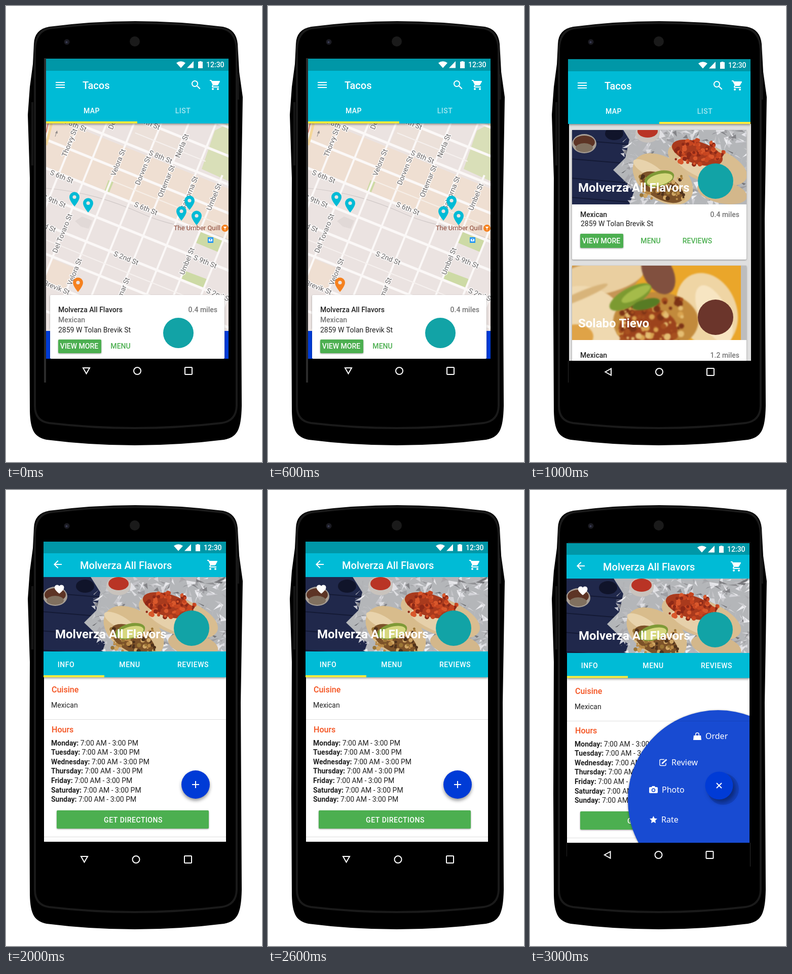
Recreate the animation shown at these times as an HTML page with a canvas. Size 505 by 901 pixels, loop 4000 ms.

```html
<!DOCTYPE html>
<html lang="en">
<head>
<meta charset="utf-8">
<title>Taco finder</title>
<style>
html, body { margin: 0; width: 100%; height: 100%; overflow: hidden; background: #fff; }
canvas { display: block; }
</style>
</head>
<body>
<canvas id="stage" width="505" height="901"></canvas>
<script>
const ctx = document.getElementById('stage').getContext('2d');
const SANS = 'Roboto, sans-serif';
const CYAN = '#00bbd6', DARK_CYAN = '#0097a7', YELLOW = '#ffeb3b', GREEN = '#4caf50';
const BLUE = '#003bd6', INK = '#212121', GREY = '#757575', ORANGE = '#f4511e';
const PLACE = 'Molverza All Flavors', ADDRESS = '2859 W Tolan Brevik St';

const ICON = {
  menu: 'M3 18h18v-2H3zM3 13h18v-2H3zM3 6v2h18V6z',
  search: 'M15.5 14h-.79l-.28-.27A6.5 6.5 0 1 0 13.73 14.43l.27.28v.79l5 4.99L20.49 19zM9.5 14A4.5 4.5 0 1 1 9.5 5a4.5 4.5 0 0 1 0 9z',
  cart: 'M7 18a2 2 0 1 0 0 4 2 2 0 0 0 0-4zM1 2v2h2l3.6 7.59-1.35 2.45A2 2 0 0 0 7 17h12v-2H7.42a.25.25 0 0 1-.22-.37l.9-1.63h7.45a2 2 0 0 0 1.75-1.03l3.58-6.49A1 1 0 0 0 20 4H5.21l-.94-2zM17 18a2 2 0 1 0 0 4 2 2 0 0 0 0-4z',
  back: 'M20 11H7.83l5.59-5.59L12 4l-8 8 8 8 1.41-1.41L7.83 13H20z',
  heart: 'M12 21.35l-1.45-1.32C5.4 15.36 2 12.28 2 8.5A5.5 5.5 0 0 1 12 5.09 5.5 5.5 0 0 1 22 8.5c0 3.78-3.4 6.86-8.55 11.54z',
  pin: 'M0-20a7 7 0 0 0-7 7C-7-7.75 0 0 0 0s7-7.75 7-13a7 7 0 0 0-7-7z',
  wifi: 'M0 3.5Q9-3 18 3.5L9 13.5z',
  bag: 'M1 6h14l1 9H0zM4 8V4a4 4 0 0 1 8 0v4h-1.5V4a2.5 2.5 0 0 0-5 0v4z',
  camera: 'M2 2h3l1-2h5l1 2h3a2 2 0 0 1 2 2v8a2 2 0 0 1-2 2H2a2 2 0 0 1-2-2V4a2 2 0 0 1 2-2z',
  star: 'M7.5 0l2.2 4.8 5.3.7-3.9 3.6 1 5.2-4.6-2.6-4.6 2.6 1-5.2L0 5.5l5.3-.7z'
};
for (const k in ICON) ICON[k] = new Path2D(ICON[k]);

function rect(x, y, w, h, color) {
  ctx.fillStyle = color;
  ctx.fillRect(x, y, w, h);
}
function disc(x, y, r, color, ry = r, turn = 0) {
  ctx.fillStyle = color;
  ctx.beginPath();
  ctx.ellipse(x, y, r, ry, turn, 0, 7);
  ctx.fill();
}
function poly(points, color) {
  ctx.fillStyle = color;
  ctx.beginPath();
  points.forEach(p => ctx.lineTo(p[0], p[1]));
  ctx.fill();
}
function line(x1, y1, x2, y2, color, width) {
  ctx.strokeStyle = color;
  ctx.lineWidth = width;
  ctx.beginPath();
  ctx.moveTo(x1, y1);
  ctx.lineTo(x2, y2);
  ctx.stroke();
}
function icon(name, x, y, color = '#fff', scale = 1) {
  ctx.save();
  ctx.translate(x, y);
  ctx.scale(scale, scale);
  ctx.fillStyle = color;
  ctx.fill(ICON[name], name === 'search' ? 'evenodd' : 'nonzero');
  ctx.restore();
}
function text(s, x, y, color = INK, { size = 14, weight = 500, align = 'left', gap = 0, family = SANS } = {}) {
  ctx.font = `${weight} ${size}px ${family}`;
  ctx.textAlign = align;
  ctx.letterSpacing = gap + 'px';
  ctx.fillStyle = color;
  ctx.fillText(s, x, y);
}
const tab = (s, x, y, color = '#fff') => text(s, x, y, color, { align: 'center', gap: 0.5 });
const centered = (s, x, y, color) => text(s, x, y, color, { align: 'center' });

function withShadow(blur, dy, draw, alpha = 0.4, dx = 0) {
  ctx.save();
  ctx.shadowColor = `rgba(0,0,0,${alpha})`;
  ctx.shadowBlur = blur;
  ctx.shadowOffsetX = dx;
  ctx.shadowOffsetY = dy;
  draw();
  ctx.restore();
}
function panel(x, y, w, h, color) {
  withShadow(3, 1, () => {
    ctx.fillStyle = color;
    ctx.beginPath();
    ctx.roundRect(x, y, w, h, 2);
    ctx.fill();
  });
}
function clipped(x, y, w, h, draw) {
  ctx.save();
  ctx.beginPath();
  ctx.rect(x, y, w, h);
  ctx.clip();
  draw();
  ctx.restore();
}
function random(seed) {
  return () => (seed = seed * 16807 % 2147483647) / 2147483647;
}

function phone() {
  rect(0, 0, 505, 901, '#fff');
  ctx.fillStyle = '#000';
  ctx.fill(new Path2D('M55 75Q56 46 85 41Q253 19 428 41Q454 46 457 75L460 130 467 180 465 300 463 420 465 790C464 840 455 852 430 857Q253 879 80 857C57 852 48 840 47 800L46 600 47 340 43 215 47 160 53 115z'));
  ctx.strokeStyle = '#1a1a1a';
  ctx.lineWidth = 4;
  ctx.stroke(new Path2D('M57 790V85Q59 49 86 44Q253 23 426 44Q453 49 455 85V790Q454 820 425 824Q253 844 85 824Q57 820 57 790z'));
  rect(457, 135, 3, 50, '#151515');
  rect(50, 190, 4, 125, '#151515');
  disc(120, 71, 5.5, '#1b1b22');
  disc(119.5, 71.5, 2, '#3a3d55');
  disc(254, 70, 10, '#1a1a1a');
}

function statusBar(x, y, h) {
  rect(x, y, 360, h, DARK_CYAN);
  icon('wifi', x + 257, y + 5);
  poly([[x + 278, y + 18.5], [x + 291, y + 18.5], [x + 291, y + 5]], '#fff');
  rect(x + 300, y + 6, 9, 13, '#fff');
  rect(x + 302.5, y + 5, 4, 1, '#fff');
  text('12:30', x + 316, y + 17, '#fff');
}

function navBar(x, y, down, tri, square) {
  ctx.strokeStyle = '#fff';
  ctx.lineWidth = 2;
  ctx.lineJoin = 'miter';
  ctx.beginPath();
  const pts = down ? [[-6.5, -6], [6.5, -6], [0, 5.5]] : [[5.5, -6.5], [5.5, 6.5], [-6, 0]];
  pts.forEach(p => ctx.lineTo(tri + p[0], y + p[1]));
  ctx.closePath();
  ctx.stroke();
  ctx.beginPath();
  ctx.arc(x, y, 7, 0, 7);
  ctx.stroke();
  ctx.beginPath();
  ctx.roundRect(square - 7, y - 7, 14, 14, 1);
  ctx.stroke();
}

function homeHeader(x, y, active) {
  withShadow(4, 2, () => rect(x, y + 24, 360, 104, CYAN));
  statusBar(x, y, 24);
  icon('menu', x + 16, y + 40);
  text('Tacos', x + 72, y + 60, '#fff', { size: 20 });
  icon('search', x + 284, y + 40);
  icon('cart', x + 322, y + 40);
  tab('MAP', x + 90, y + 108);
  tab('LIST', x + 270, y + 108, 'rgba(255,255,255,.65)');
  rect(x + active * 180, y + 124, 180, 4, YELLOW);
}

const STREETS = [
  ['Thorvy St', 125, 270, 1], ['Del Tovaro St', 221, 205, 1], ['S 8th St', 136, 235, 0],
  ['S 4th St', 281, 231, 0], ['Nerla St', 347, 276, 1], ['S 8th St', 305, 298, 0],
  ['Velora St', 221, 309, 1], ['Dorven St', 270, 325, 1], ['Ottemar St', 316, 346, 1],
  ['S 6th St', 110, 337, 0], ['Galvorna St', 361, 370, 1], ['Umbel St', 410, 377, 1],
  ['S 6th St', 276, 400, 0], ['S 9th St', 95, 385, 0], ['Del Tovaro St', 111, 449, 1],
  ['S 2nd St', 74, 433, 0], ['S 2nd St', 237, 498, 0], ['S 9th St', 393, 505, 0],
  ['Umbel St', 357, 504, 1], ['Velora St', 135, 525, 1], ['Brevik St', 100, 556, 0],
  ['Ottemar St', 227, 568, 1], ['S 2nd St', 420, 571, 0]
];
const TILT = 22 * Math.PI / 180;

function streetName([s, x, y, up]) {
  ctx.save();
  ctx.translate(x, y);
  ctx.rotate(up ? TILT - Math.PI / 2 : TILT);
  ctx.font = `400 14px ${SANS}`;
  ctx.textAlign = 'center';
  ctx.letterSpacing = '0px';
  ctx.strokeStyle = 'rgba(255,255,255,.85)';
  ctx.lineWidth = 3;
  ctx.lineJoin = 'round';
  ctx.strokeText(s, 0, 5);
  text(s, 0, 5, '#6a6767', { weight: 400, align: 'center' });
  ctx.restore();
}

function cityMap() {
  rect(79, 232, 360, 410, '#ebe3e1');
  ctx.save();
  ctx.rotate(TILT);
  rect(150, 170, 480, 95, '#efdfd2');
  rect(268, 429, 50, 48, '#efdfd2');
  rect(325, 110, 95, 54, '#ece1da');
  ctx.restore();
  poly([[412, 246], [439, 232], [439, 346], [386, 322]], '#d9dfb8');
  poly([[385, 445], [427, 462], [418, 486], [375, 468]], '#cddaa5');
  poly([[352, 523], [397, 540], [388, 558], [344, 541]], '#cddaa5');
  poly([[202, 344], [212, 348], [203, 370], [194, 366]], '#cddaa5');
  poly([[136, 425], [150, 416], [170, 424], [163, 440], [148, 436]], '#e1d9d7');

  ctx.strokeStyle = '#cfc8c7';
  ctx.lineWidth = 1.2;
  ctx.stroke(new Path2D('M79 360C150 366 210 384 270 411S380 436 439 462'));

  ctx.save();
  ctx.rotate(TILT);
  for (let q = 58; q < 600; q += 52.4) line(80, q, 680, q, '#fbf8f7', 5);
  for (let p = 171; p < 680; p += 50) {
    const top = p > 500 ? 150 : -60;
    line(p, top, p, 600, '#fbf8f7', 4);
  }
  line(330, 137, 480, 137, '#f6f1ef', 2);
  line(320, 242, 570, 242, '#f6efe8', 2);
  line(200, 399, 560, 399, '#f6f1ef', 2);
  ctx.restore();
  line(90, 232, 79, 275, '#f4d79a', 5);
  line(83, 232, 79, 250, '#d9695a', 1.5);
  line(97, 258, 100, 248, '#8f8a89', 1);
  poly([[97, 251], [101, 246], [102, 252]], '#8f8a89');
  STREETS.forEach(streetName);

  text('The Umber Quill', 423, 443, '#8a4635', { size: 13, weight: 400, align: 'right' });
  disc(432, 439, 7, '#f5811f');
  poly([[428.5, 436], [435.5, 436], [432, 440]], '#fff');
  rect(431.5, 439, 1, 4, '#fff');
  rect(398, 457, 11, 11, '#2196f3');
  rect(400, 460, 7, 5, '#fff');
  rect(402, 461, 3, 2, '#2196f3');
}

function pin(x, y, color = CYAN) {
  icon('pin', x, y, color, 1.42);
  disc(x, y - 18.5, 3.6, '#ebe3e1');
}

function mapScreen() {
  rect(75, 103, 4, 641, '#2b2b2b');
  clipped(79, 104, 360, 593, () => {
    cityMap();
    rect(79, 642, 360, 55, BLUE);
    [[135, 396], [162, 408], [362, 403], [346, 424], [376, 433]].forEach(p => pin(...p));
    pin(142, 565, '#f5811f');
    homeHeader(79, 104, 0);
    panel(87, 571, 344, 126, '#fff');
    text(PLACE, 103, 605);
    text('0.4 miles', 417, 605, GREY, { align: 'right' });
    text('Mexican', 103, 625, GREY);
    text(ADDRESS, 103, 645, INK, { weight: 400 });
    disc(340, 646, 30, '#12a3a6');
    panel(103, 659, 85, 27, GREEN);
    centered('VIEW MORE', 144.5, 677, '#fff');
    centered('MENU', 226, 677, GREEN);
  });
  navBar(259, 721, true, 158.5, 360);
}

function tacoPhoto(x, y, w, h, dx, dy) {
  clipped(x, y, w, h, () => {
    ctx.translate(x + dx, y + dy);
    rect(-5, -5, 370, 170, '#20284b');
    for (let i = 0; i < 4; i++) line(-5, 30 + i * 38, 190, 46 + i * 38, '#141a35', 2);
    disc(82, 18, 18, '#10142a', 13);
    poly([[112, 30], [90, -5], [370, -5], [370, 170], [108, 170], [122, 130], [80, 90], [104, 66]], '#b4b6b9');
    const rnd = random(71);
    for (let i = 0; i < 420; i++) {
      const px = 104 + rnd() * 260, py = rnd() * 160, v = 70 + Math.sqrt(rnd()) * 185 | 0;
      const spot = () => [px + rnd() * 24 - 12, py + rnd() * 22 - 11];
      poly([spot(), spot(), spot()], `rgba(${v},${v},${v + 4},.8)`);
    }
    disc(23, 38, 24, '#a79f96', 19);
    disc(23, 35, 21, '#5d3425', 13);
    disc(23, 46, 17, '#80705f', 9);
    disc(148, 17, 24, '#c9c3bd', 19);
    disc(148, 13, 20, '#b93425', 13);
    disc(266, 78, 82, '#d9bd90', 36, 0.35);
    disc(262, 92, 60, '#e6d0aa', 16, 0.4);
    disc(246, 56, 52, '#a93a1d', 22, 0.3);
    for (let i = 0; i < 90; i++) {
      const a = rnd() * 7, r = Math.sqrt(rnd());
      disc(246 + Math.cos(a) * 52 * r, 55 + Math.sin(a) * 25 * r, 2 + rnd() * 3, ['#c64520', '#8e2917', '#d9582c'][i % 3]);
    }
    disc(178, 108, 66, '#d8bc8c', 42, 0.6);
    disc(150, 88, 34, '#e8d3ac', 12, 0.5);
    disc(176, 124, 48, '#7c5229', 24, 0.5);
    for (let i = 0; i < 80; i++) {
      disc(134 + rnd() * 88, 102 + rnd() * 46, 1.5 + rnd() * 3, ['#b98a47', '#4f321c', '#9a7535', '#d0a765'][i % 4]);
    }
    disc(171, 107, 30, '#7f9a37', 15, -0.25);
    disc(172, 109, 26, '#d6d77e', 11, -0.25);
    disc(295, 134, 50, '#d3b78b', 22, 0.2);
  });
}

function wrapPhoto(x, y, w, h) {
  clipped(x, y, w, h, () => {
    ctx.translate(x, y);
    ctx.filter = 'blur(1.5px)';
    rect(-5, -5, w + 10, h + 10, '#eaa62a');
    poly([[0, 0], [150, 0], [110, 60], [0, 90]], '#c79556');
    disc(50, 25, 95, '#eacfa0', 33, -0.2);
    disc(30, 105, 80, '#efd9b0', 62, 0.4);
    disc(15, 60, 60, '#d8b47a', 8, -0.4);
    disc(8, 140, 34, '#dfa347', 24);
    disc(266, 88, 58, '#efd5a4', 76, -0.4);
    disc(280, 96, 28, '#f7e5c2', 62, -0.45);
    disc(165, 110, 84, '#c28a3c', 58);
    disc(170, 14, 29, '#81503f', 46, -0.5);
    disc(150, 126, 58, '#9c431c', 42);
    const rnd = random(29);
    for (let i = 0; i < 90; i++) {
      disc(95 + rnd() * 125, 62 + rnd() * 86, 2 + rnd() * 5, ['#d9a34f', '#a7501f', '#e4bd72', '#7c3316'][i % 4]);
    }
    disc(115, 62, 46, '#7c9a31', 18, -0.5);
    disc(126, 56, 32, '#a5bb4a', 10, -0.5);
    disc(146, 76, 28, '#577b24', 10, -0.25);
  });
}

function photoTitle(s, x, y) {
  text(s, x, y, '#fff', { size: 24, weight: 700 });
}

function listScreen() {
  rect(75, 701, 1, 43, '#2b2b2b');
  clipped(75, 105, 361, 596, () => {
    rect(77, 233, 359, 468, '#dfdfdf');
    homeHeader(75, 105, 1);
    panel(83, 245, 344, 256, '#fff');
    tacoPhoto(83, 245, 344, 147, 1, -11);
    disc(366, 346, 35, '#12a3a6');
    photoTitle(PLACE, 95, 367);
    text('Mexican', 99, 417);
    text('0.4 miles', 413, 417, GREY, { align: 'right' });
    text(ADDRESS, 100, 435, INK, { weight: 400 });
    panel(99, 450, 85, 28, GREEN);
    centered('VIEW MORE', 140.5, 469, '#fff');
    centered('MENU', 238, 469, GREEN);
    centered('REVIEWS', 330, 469, GREEN);

    panel(83, 513, 344, 200, '#fff');
    rect(83, 513, 344, 147, '#bdbdbd');
    wrapPhoto(83, 513, 333, 147);
    disc(366, 615, 35, '#6b352b');
    photoTitle('Solabo Tievo', 95, 635);
    text('Mexican', 99, 695);
    text('1.2 miles', 413, 695, GREY, { align: 'right' });
  });
  navBar(255, 723, false, 154.5, 356);
}

const DAYS = ['Monday', 'Tuesday', 'Wednesday', 'Thursday', 'Friday', 'Saturday', 'Sunday'];

// lead nudges the title; low is the top of the lower half.
function detailPage(x, y, lead, low) {
  const row = Math.ceil(low), left = x + 1 + lead;
  rect(left, y + 216, 361, 377, '#fff');
  rect(x - 1, y, 361, 70, CYAN);
  rect(x - 1, y, 1, 23, DARK_CYAN);
  statusBar(x, y, 23);
  icon('back', x + 16 + lead, y + 33);
  text(PLACE, x + 72 + lead, y + 54, '#fff', { size: 20 });
  icon('cart', x + 322, y + 34);

  withShadow(4, 2, () => rect(x, y + 216, 360, low - y + 52 - 216, CYAN));
  tacoPhoto(x + lead, y + 70, 360 - lead, 147, 0, 0);
  icon('heart', x + 20, y + 83, '#fff', 0.93);
  disc(x + 292, y + 171, 35, '#12a3a6');
  photoTitle(PLACE, x + 23, y + 191);
  tab('INFO', x + 44.5, row + 32);
  tab('MENU', x + 170, row + 32);
  tab('REVIEWS', x + 295, row + 32);
  rect(x, low + 48, 120, 4, YELLOW);

  text('Cuisine', x + 16, y + 298, ORANGE, { size: 16 });
  text('Mexican', x + 15, y + 328, INK, { weight: 400 });
  rect(left, y + 351, 360, 1, '#dedede');
  text('Hours', x + 16, row + 161, ORANGE, { size: 16 });
  DAYS.forEach((day, i) => {
    const base = Math.floor(row + 187 + i * 18.6);
    text(day + ':', x + 15, base, INK, { weight: 700 });
    const w = ctx.measureText(day + ': ').width;
    text('7:00 AM - 3:00 PM', x + 15 + w, base, INK, { weight: 400 });
  });
  panel(x + 26, row + 315, 300, 36, GREEN);
  tab('GET DIRECTIONS', x + 177, row + 339);
  rect(left, row + 367, 360, 1, '#dedede');
}

function infoScreen() {
  clipped(74, 102, 360, 593, () => {
    detailPage(74, 102, 0, 318);
    withShadow(6, 4, () => disc(374, 582, 28, BLUE));
    rect(367, 581, 14, 2, '#fff');
    rect(373, 575, 2, 14, '#fff');
  });
  navBar(256.5, 730, true, 154.5, 359);
}

function editIcon(x, y) {
  ctx.strokeStyle = '#fff';
  ctx.lineWidth = 1.4;
  ctx.stroke(new Path2D(`M${x + 10} ${y + 1.5}H${x + 3}q-2 0-2 2v8q0 2 2 2h8q2 0 2-2v-3`));
  line(x + 6, y + 9, x + 14.5, y + 1.5, '#fff', 3);
  poly([[x + 4.5, y + 10.5], [x + 5.5, y + 7], [x + 8, y + 10]], '#fff');
}

function menuScreen() {
  rect(75, 103, 360, 1, '#242424');
  rect(434, 697, 1, 47, '#2b2b2b');
  rect(72, 697, 1, 27, '#242424');
  clipped(72, 105, 361, 592, () => {
    detailPage(73, 105, -1, 319.5);
    withShadow(4, 1, () => disc(371, 613, 178, '#184bd2'));
    rect(285, 456, 148, 1, 'rgba(0,0,0,.1)');
    disc(381, 591, 31, 'rgba(0,20,90,.2)');
    withShadow(8, 6, () => disc(373, 584, 27.5, BLUE), 0.35, 5);
    line(368, 579, 378, 589, '#fff', 2);
    line(378, 579, 368, 589, '#fff', 2);

    icon('bag', 322, 479);
    editIcon(255, 531);
    icon('camera', 235, 585);
    disc(243.5, 593, 3.8, '#184bd2');
    disc(243.5, 593, 2.2, '#fff');
    icon('star', 236, 644);
    [['Order', 346, 492], ['Review', 279, 544], ['Photo', 260, 598], ['Rate', 259, 657]]
      .forEach(([s, x, y]) => text(s, x, y, '#fff', { size: 16, weight: 400, family: '"Noto Sans", sans-serif' }));
  });
  navBar(253.5, 721, false, 153, 354.5);
}

const SCREENS = [mapScreen, listScreen, infoScreen, menuScreen];
const start = performance.now();
let shown = -1;

function tick() {
  const i = Math.floor((performance.now() - start) / 1000) % SCREENS.length;
  if (i !== shown) {
    shown = i;
    phone();
    SCREENS[i]();
  }
  requestAnimationFrame(tick);
}
tick();
</script>
</body>
</html>
```
